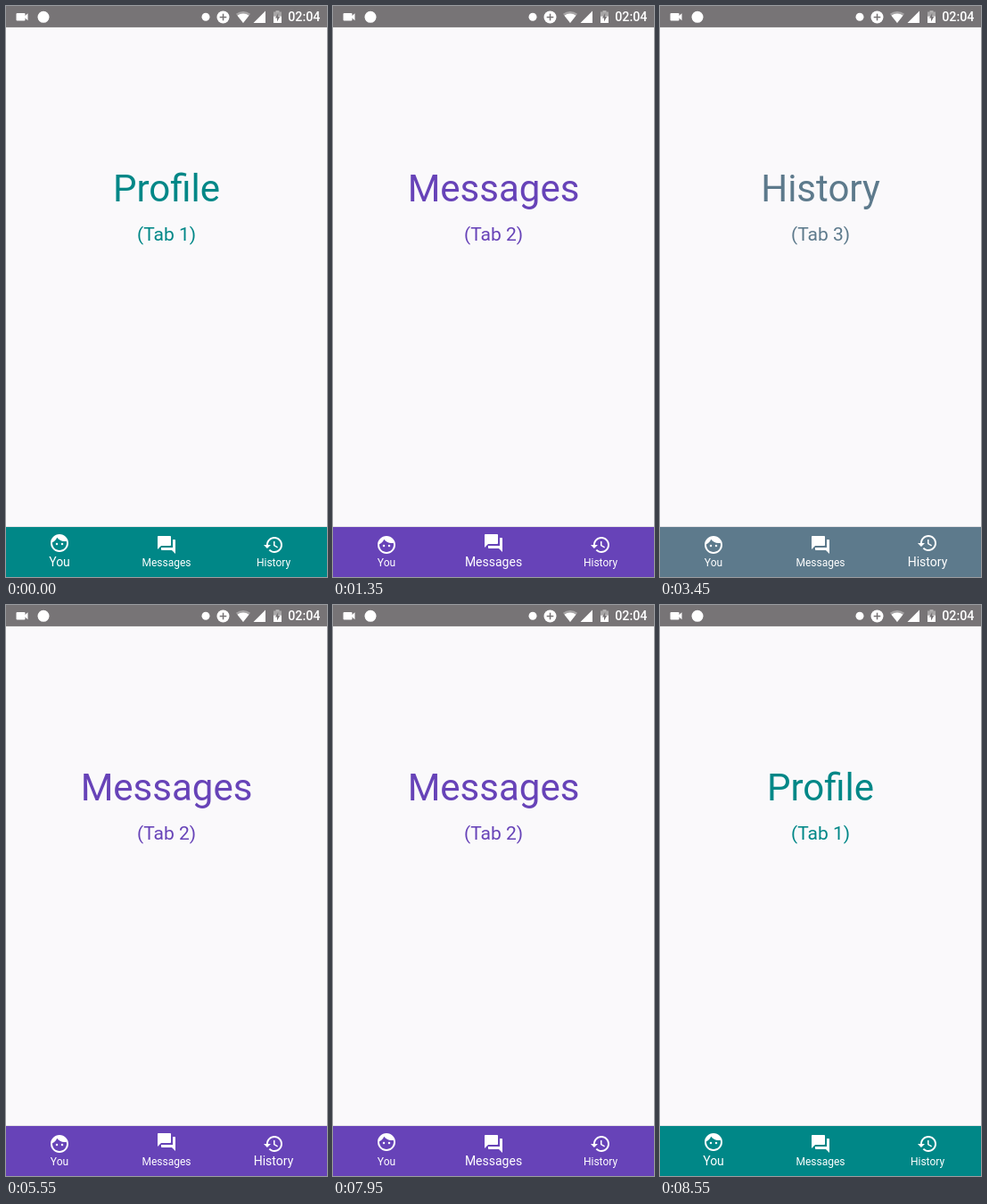
An HTML page with a canvas for the animation above (9.15 s loop, 360x640 px).

```html
<!DOCTYPE html>
<html lang="en">
<head>
<meta charset="utf-8">
<title>Bottom tabs</title>
<style>
html, body { margin: 0; width: 100%; height: 100%; overflow: hidden; background: #faf9fb; }
canvas { display: block; width: 360px; height: 640px; }
</style>
</head>
<body>
<canvas id="stage"></canvas>
<script>
const W = 360, H = 640, BAR = 584, LOOP = 9150, STEP = 50;
const canvas = document.getElementById('stage');
const ctx = canvas.getContext('2d');
const ratio = window.devicePixelRatio || 1;
canvas.width = W * ratio;
canvas.height = H * ratio;

const FACE = 'M12 2C6.48 2 2 6.48 2 12s4.48 10 10 10 10-4.48 10-10S17.52 2 12 2z' +
  'm0 18c-4.41 0-8-3.59-8-8 0-.29.02-.58.05-.86 2.36-1.05 4.23-2.98 5.21-5.37' +
  'C11.07 8.33 14.05 10 17.42 10c.78 0 1.53-.09 2.25-.26.21.71.33 1.47.33 2.26 0 4.41-3.59 8-8 8z' +
  'M7.75 13a1.25 1.25 0 1 0 2.5 0a1.25 1.25 0 1 0-2.5 0z' +
  'm6 0a1.25 1.25 0 1 0 2.5 0a1.25 1.25 0 1 0-2.5 0z';
const BUBBLES = 'M21 6h-2v9H6v2c0 .55.45 1 1 1h11l4 4V7c0-.55-.45-1-1-1z' +
  'm-4 6V3c0-.55-.45-1-1-1H3c-.55 0-1 .45-1 1v14l4-4h10c.55 0 1-.45 1-1z';
const CLOCK = 'M13 3c-4.97 0-9 4.03-9 9H1l3.89 3.89.07.14L9 12H6c0-3.87 3.13-7 7-7s7 3.13 7 7-3.13 7-7 7' +
  'c-1.93 0-3.68-.79-4.94-2.06l-1.42 1.42C8.27 19.99 10.51 21 13 21c4.97 0 9-4.03 9-9s-4.03-9-9-9z' +
  'm-1 5v5l4.28 2.54.72-1.21-3.5-2.08V8H12z';

const tabs = [
  { x: 60, label: 'You', title: 'Profile', color: '#008787', icon: new Path2D(FACE) },
  { x: 180, label: 'Messages', title: 'Messages', color: '#6743b8', icon: new Path2D(BUBBLES) },
  { x: 300, label: 'History', title: 'History', color: '#5d7a8c', icon: new Path2D(CLOCK) }
];

// reveal and swap are delays after the tap
const taps = [
  { at: 800, from: 0, to: 1, reveal: 150, swap: 200 },
  { at: 2900, from: 1, to: 2, reveal: 150, swap: 200 },
  { at: 5550, from: 2, to: 1, reveal: -300, swap: 0 },
  { at: 7950, from: 1, to: 0, reveal: 150, swap: 200 }
];
const idle = { at: -5000, from: 0, to: 0, reveal: 0, swap: 0 };

const clamp = v => Math.max(0, Math.min(1, v));
const ease = p => (1 - Math.cos(Math.PI * p)) / 2;

function text(str, x, y, size, color, weight = 400) {
  ctx.font = `${weight} ${size}px Roboto, sans-serif`;
  ctx.textAlign = 'center';
  ctx.fillStyle = color;
  ctx.fillText(str, x, y);
}

function disc(x, y, r, color) {
  ctx.fillStyle = color;
  ctx.beginPath();
  ctx.arc(x, y, r, 0, Math.PI * 2);
  ctx.fill();
}

function rect(x, y, w, h, color) {
  ctx.fillStyle = color;
  ctx.fillRect(x, y, w, h);
}

function poly(points, color) {
  ctx.fillStyle = color;
  ctx.beginPath();
  points.forEach(([x, y]) => ctx.lineTo(x, y));
  ctx.fill();
}

function wedge(r, color) {
  ctx.fillStyle = color;
  ctx.beginPath();
  ctx.moveTo(266, 19);
  ctx.arc(266, 19, r, -Math.PI / 2 - 0.67, -Math.PI / 2 + 0.67);
  ctx.fill();
}

function statusBar() {
  const gray = '#777476', dim = 'rgba(255,255,255,.35)';
  rect(0, 0, W, 24, gray);
  rect(0, 23, W, 1, '#828081');

  ctx.fillStyle = '#fff';
  ctx.beginPath();
  ctx.roundRect(11.5, 8, 10, 8.5, 1);
  ctx.fill();
  poly([[21, 11.3], [24.5, 8.3], [24.5, 16.2], [21, 13.2]], '#fff');
  disc(42, 12.3, 6.5, '#fff');
  disc(224, 12.3, 4.5, '#fff');

  disc(243.5, 12.5, 7, '#fff');
  rect(239.7, 11.8, 7.6, 1.5, gray);
  rect(242.8, 8.7, 1.5, 7.6, gray);

  wedge(13, dim);
  wedge(10.5, '#fff');
  poly([[277.5, 19], [291, 5.5], [291, 19]], '#fff');

  rect(302.5, 5, 4, 2, dim);
  rect(300, 6.5, 9, 5, dim);
  rect(300, 11.5, 9, 7.5, '#fff');
  poly([[305.2, 8], [302, 13.5], [304, 13.5], [304, 17.5], [307.2, 12], [305.2, 12]], gray);

  text('02:04', 334.3, 17.3, 14.3, '#fff', 500);
}

function ripple(x, dt) {
  if (dt <= 0 || dt >= 550) return;
  const left = 1 - clamp(dt / 450);
  const alpha = 0.09 * (1 - clamp((dt - 200) / 350));
  disc(x + 3, 612, 68 * (1 - left * left), `rgba(0,0,0,${alpha})`);
}

function bottomBar(tap, dt) {
  const next = tabs[tap.to];
  const open = ease(clamp((dt - tap.reveal) / 300));
  rect(0, BAR - 1, W, 1, '#e3e2e5');
  ctx.save();
  ctx.beginPath();
  ctx.rect(0, BAR, W, H - BAR);
  ctx.clip();
  rect(0, BAR, W, H - BAR, open < 1 ? tabs[tap.from].color : next.color);
  if (open > 0 && open < 1) disc(next.x, 612, open * W, next.color);
  ripple(next.x, dt);
  ctx.restore();

  const grow = clamp(dt / 150);
  tabs.forEach((tab, i) => {
    const active = i === tap.to;
    const share = active ? (tap.from === tap.to ? 1 : grow) : i === tap.from ? 1 - grow : 0;
    ctx.save();
    ctx.translate(tab.x - 12, (active ? 602 : 604) - 12);
    ctx.fillStyle = '#fff';
    ctx.fill(tab.icon, 'evenodd');
    ctx.restore();
    text(tab.label, tab.x, 628, 12 + 2 * share, '#fff');
  });
}

function draw(t) {
  const tap = taps.filter(p => p.at <= t).pop() || idle;
  const dt = t - tap.at;
  const page = dt >= tap.swap ? tap.to : tap.from;
  const { title, color } = tabs[page];
  ctx.setTransform(ratio, 0, 0, ratio, 0, 0);
  rect(0, 0, W, H, '#faf9fb');
  statusBar();
  text(title, 180, 219, 42, color);
  text(`(Tab ${page + 1})`, 180, 263, 21, color);
  bottomBar(tap, dt);
}

const start = performance.now();
function tick() {
  const t = (performance.now() - start) % LOOP;
  draw(Math.floor(t / STEP) * STEP);
  requestAnimationFrame(tick);
}
tick();
</script>
</body>
</html>
```
